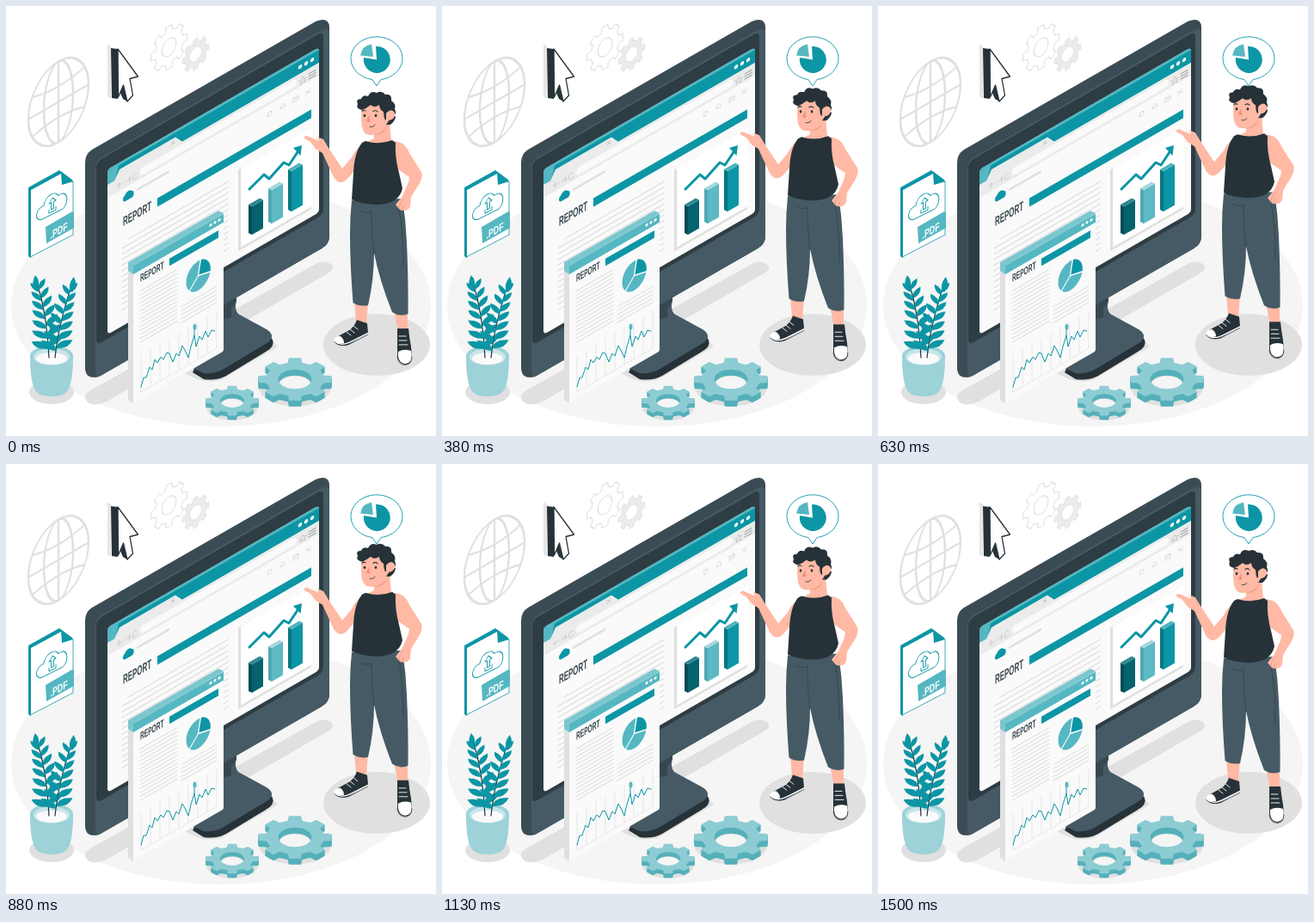
Write an HTML page that moves like this. It is 500 by 500 pixels and loops after 1540 ms.

```html
<!DOCTYPE html>
<html lang="en">
<head>
<meta charset="utf-8">
<title>Report</title>
<style>
html, body { margin: 0; width: 100%; height: 100%; overflow: hidden; background: #fff }
svg { display: block; width: 100vw; height: 100vh }
text { font-family: "Liberation Sans", Arial, sans-serif; font-weight: 700 }
.ln { fill: none; stroke-linecap: round; stroke-linejoin: round }
.teal { fill: #0c96a5 } .mid { fill: #55b7c1 } .pale { fill: #9dd2d9 }
.dark { fill: #263238 } .slate { fill: #37474f } .steel { fill: #455a64 }
.grey { fill: #e0e0e0 } .white { fill: #fff } .skin { fill: #ffb9a4 }
</style>
</head>
<body>
<svg viewBox="0 0 500 500">
  <ellipse cx="250" cy="348" rx="244" ry="141" fill="#f5f5f5"/>
  <g class="grey">
    <ellipse cx="431" cy="394" rx="62" ry="36"/>
    <ellipse cx="53" cy="449" rx="26" ry="14"/>
    <path d="M92 456Q91 451 98 447L362 299Q369 295 378 300Q384 305 374 311L122 457Q112 464 100 463Q93 461 92 456Z"/>
    <path d="M208 427L250 402L310 390L316 396L250 435Q235 439 220 433Z"/>
  </g>

  <!-- globe -->
  <g class="ln" transform="matrix(1 -.58 0 1 61 111.5)" stroke="#e0e0e0" stroke-width="2.4">
    <ellipse rx="35" ry="47"/><ellipse rx="17" ry="47"/>
    <path d="M0-47V47M-35 0H35M-30-23Q0-13 30-23M-30 23Q0 13 30 23"/>
  </g>
  <g id="skyGears" stroke="#e0e0e0"></g>

  <!-- pointer -->
  <path d="M118 44L122 47V108L118 105Z" fill="#e6e6e6"/>
  <path class="dark" d="M122 49L130 50V108L123 107ZM133 101L136 92L141 111L136 108Z"/>
  <path d="M130 50L153.500 82L144 84.500L147.500 104L141 111L136.500 92L130.500 106Z" fill="#fff" stroke="#263238" stroke-width="1.300" stroke-linejoin="round"/>

  <!-- PDF sheet -->
  <path class="white" d="M28 213L64 193L78 204V266L28 292Z" stroke="#0c96a5" stroke-width=".8"/>
  <path class="teal" d="M26 211L62 191L77 202L78 205L64 195L29 214V293L26 291ZM64 194L78 204L65 208Z"/>
  <g class="ln" transform="matrix(1 -.5 0 1 54 231)" stroke="#0c96a5" stroke-width=".9">
    <path d="M-12 11A7 7 0 0 1-10-4A9 10 0 0 1 7-7A7 9 0 0 1 12 11Z"/>
    <path d="M-1.500 5V-3H-4L0-8L4-3H1.500V5ZM-4 4V8H4V4"/>
  </g>
  <path class="mid" d="M46 257L77 239L79 240V258L47 276Z"/>
  <text transform="matrix(.68 -.37 0 1 51.500 271)" font-size="13" fill="#fff">.PDF</text>

  <!-- plant -->
  <path class="pale" d="M28 407Q28 434 33 445Q37 454 53 454Q69 454 73 445Q78 434 78 407Z"/>
  <ellipse class="pale" cx="53" cy="407" rx="25" ry="12"/>
  <ellipse cx="53" cy="408" rx="21" ry="9.500" fill="#c8e6ea"/>
  <ellipse cx="53" cy="410" rx="18" ry="7" fill="#fafafa"/>
  <g id="plant"></g>

  <!-- monitor -->
  <path class="dark" d="M217 426L250 358L265 360L304 381L310 388Q313 396 302 402L256 430Q245 436 230 434Z"/>
  <path class="steel" d="M217 421L236 345L268 330V343Q265 352 270 358L303 376Q314 383 305 391L255 421Q245 428 230 427Z"/>
  <path class="slate" d="M240 345L268 328V343L262 352L262 362L240 368Z"/>
  <path d="M92 182Q92 172 100 167L360 18Q375 12 376 24V268Q376 277 367 282L108 431Q92 435 92 420Z" fill="#3b4b54"/>
  <path class="steel" d="M104 189Q104 180 111 176L365 29Q376 24 376 32V268Q376 277 367 282L110 430Q104 433 104 424Z"/>
  <g transform="matrix(1 -.577 0 1 118 187)">
    <rect x="-13" y="-13" width="264" height="213" rx="6" fill="#2e3c43"/>
    <rect y="3" width="246" height="192" rx="4" fill="#fafafa"/>
    <path class="teal" d="M0 21V7Q0 3 4 3H242Q246 3 246 7V21Z"/>
    <path class="mid" d="M0 21V7Q0 3 4 3H242Q245 3 246 6H13L9 21Z"/>
    <path d="M0 21H8L14 11H79L87 21H246V36H0Z" fill="#ebebeb"/>
    <g class="white"><circle cx="224" cy="13" r="2.200"/><circle cx="231" cy="13" r="2.200"/><circle cx="238" cy="13" r="2.200"/></g>
    <rect x="38" y="24" width="182" height="9" rx="4" fill="#fafafa"/>
    <g class="ln" stroke="#c4c4c4" stroke-width=".8">
      <path d="M74 14L78 18M78 14L74 18M12 29H18M12 29L14 26.500M12 29L14 31.500M21 29H27M27 29L25 26.500M27 29L25 31.500M34 27A2.700 3.400 0 1 0 34.500 31"/>
      <path d="M227 26L228 29H231L229 31L230 34L227 32L224 34L225 31L223 29H226Z"/>
      <path d="M234 27H242M234 30H242M234 33H242" stroke="#a0a0a0" stroke-width="1.200"/>
      <path d="M186 47A2.500 2.500 0 1 0 191 47A2.500 2.500 0 1 0 186 47M201 49H207L206 47V46Q204 43 202 46V47ZM216 45H222V50H216ZM216 45L219 48L222 45M231 45L236 50M236 45L231 50" stroke="#d6d6d6"/>
    </g>
    <rect x="34" y="45" width="38" height="3" fill="#e0e0e0"/>
    <path class="teal" d="M20 52A4 4 0 0 1 20 45A5 6 0 0 1 28 44A4 4.500 0 0 1 29 52Z"/>
    <rect class="teal" x="58" y="70" width="179" height="10"/>
    <path id="pageRows" class="ln" stroke="#e0e0e0" stroke-width="1.400"/>
    <rect class="grey" x="152" y="91" width="85" height="95"/>
    <rect class="white" x="155" y="91" width="83" height="92"/>
  </g>
  <text transform="matrix(.53 -.306 0 1 136 256)" font-size="15" fill="#37474f">REPORT</text>
  <g id="bars"></g>
  <path class="ln" d="M283 213L300 196L306 201L323 182L329 185L341 167" stroke="#0c96a5" stroke-width="3"/>
  <path class="teal" d="M334 165L344 162L342.500 174Z"/>

  <!-- report window -->
  <path class="grey" d="M142 300L148 303V462L142 458Z"/>
  <path d="M142 298L247 238L253 241L148 312L142 308Z" fill="#7cc7cf"/>
  <g transform="matrix(1 -.577 0 1 148 302)">
    <rect width="105" height="160" rx="2" fill="#fafafa"/>
    <rect class="mid" width="105" height="10"/>
    <g class="white"><circle cx="90" cy="4.500" r="1.600"/><circle cx="95" cy="4.500" r="1.600"/><circle cx="100" cy="4.500" r="1.600"/></g>
    <rect class="teal" x="42" y="16" width="57" height="8.500"/>
    <path id="windowRows" class="ln" stroke="#dcdcdc" stroke-width="1.100"/>
    <g transform="translate(75.500 55) scale(15 18)" stroke="#fafafa" stroke-width=".09">
      <circle class="mid" r="1"/>
      <path class="mid" d="M0 0L-.7 .7A1 1 0 0 1 .2-.98Z"/>
      <path class="teal" d="M0 0L.2-.98A1 1 0 0 1 .98 .2Z"/>
    </g>
    <path id="chartGrid" class="ln" stroke="#e0e0e0" stroke-width=".8"/>
  </g>
  <text transform="matrix(.53 -.306 0 1 156 321)" font-size="12.500" fill="#37474f">REPORT</text>
  <path class="ln" stroke="#0c96a5" stroke-width="1" d="M157 443L160 432L163 432L167 420L170 423L173 411L176 415L180 408L183 411L187 403L190 404L194 414L198 404L201 407L205 395L208 400L212 409L215 396L219 383L221 396L225 384L228 388L232 378L235 385L239 377L243 378M219 383V373"/>
  <ellipse class="mid" cx="219.500" cy="373" rx="2" ry="3.500"/>

  <g id="floorGears"></g>

  <!-- thought bubble -->
  <path d="M426 85.500A30 25 0 1 1 436 85.500L431 93Z" fill="#fff" stroke="#0c96a5" stroke-width=".9"/>
  <path class="teal" d="M431 62.500L430 47A15.500 15.500 0 1 1 416 60Z"/>
  <path class="mid" d="M427 59L425 44.500Q414 46 412 57.500Z"/>

  <g id="man">
    <!-- legs and shoes -->
    <path class="skin" d="M405 343H421L419 370L407 367ZM451 354H467V378H456Z"/>
    <path class="dark" d="M408 365L420 369L421 380Q417 384 411 386L398 394Q386 397 382 390Q382 386 388 383L399 377Q405 373 408 365ZM455 375H468Q469 386 471 396L472 408Q471 417 464 417Q456 416 455 407Z"/>
    <path class="white" d="M381.500 387Q385 383 389 384Q393 387 393 392Q385 394 381.500 390ZM456 402Q463 398 471 401Q474 415 464 416Q455 415 456 402Z"/>
    <path class="ln" stroke="#fff" stroke-width="1.400" d="M382 390.500Q390 396 400 391L421 380.500"/>
    <path class="ln" stroke="#fff" stroke-width=".9" d="M396 379L401 383M400 376L405 380M404 372L409 376M457 384H465M457 389H466M457 394H467"/>
    <path class="ln" stroke="#263238" stroke-width=".7" d="M381.500 390.500Q388 397 399 393.500L421 382M455 408Q456 417 464 417.500Q472 417 472 408"/>
    <path class="steel" d="M402 226L461 224Q465 250 466 275Q468 320 467.500 358Q458 362 449 356Q434 318 428 287Q428 318 421 348Q411 350 403.500 345Q400 300 400 265Q400 245 402 226Z"/>
    <path class="ln" stroke="#37474f" stroke-width="1" d="M457 236Q462 262 462 302M425 238Q424 262 428 288M412 238Q416 241 425 240"/>
    <!-- far arm -->
    <path class="skin" d="M449 157Q464 157 469 171L483 193Q485 198 481 206L471 222L470 233Q467 240 458 237L453 231L461 221L468 205L469 199L456 190L448 175Z"/>
    <path class="ln" stroke="#e98f7c" stroke-width=".7" d="M457 236Q457 229 462 225M461 237L462 232"/>
    <!-- near arm -->
    <path class="skin" d="M418 158Q407 165 402 176L391 189L375 165L369 155L362 152L364 157L350 151Q346 151 347 154L354 158L360 166L368 171L381 199Q388 210 397 201L409 187Z"/>
    <!-- torso -->
    <path class="skin" d="M427 142L446 136L448 156Q436 167 420 158L428 154Z"/>
    <path d="M428 150Q439 150 443 141L428 147Z" fill="#f09a87"/>
    <path class="dark" d="M418 157Q434 162 449 156L453 159Q452 176 457 194L461 212Q457 231 430 231Q412 230 402 225L404 194Q405 170 414 159Z"/>
    <!-- head -->
    <path class="skin" d="M414 117Q412 130 414 141Q416 150 424 150Q434 150 441 143L447 137Q454 134 452 126L446 110L424 110Z"/>
    <path class="dark" d="M414 121Q406 119 409 114Q406 108 413 108Q415 103 421 105Q424 98 431 101Q437 98 441 103Q449 102 448 110Q454 114 452 120Q455 126 450 127Q444 121 443 130L441 133Q439 129 439 123Q434 120 434 115Q428 119 424 115Q419 119 414 121Z"/>
    <path class="dark" d="M446 132Q449 133 450 129L453 128Q453 133 447 138L442 138Z"/>
    <path class="skin" d="M442 125Q448 118 452 124Q453 131 446 133L442 131Z"/>
    <path class="ln" stroke="#263238" stroke-width="1.100" d="M414 122.500Q416 120.500 418 122M427 122.500Q430 120.500 432 123"/>
    <g class="dark"><ellipse cx="417" cy="127.500" rx="1.300" ry="1.700"/><ellipse cx="430" cy="127.500" rx="1.300" ry="1.700"/></g>
    <path d="M422 127L419 134L423 135Z" fill="#f08c78"/>
    <path class="ln" stroke="#263238" stroke-width=".8" d="M423 140.500Q426 142 429 138.500"/>
  </g>
</svg>
<script>
const $ = id => document.getElementById(id);
const LOOP = 1540, LIFT = 8, LEAD = 50;

// Horizontal rules from x0 to x1, one every `step`
function rows(x0, x1, y0, y1, step) {
  let d = '';
  for (let y = y0; y <= y1; y += step) d += `M${x0} ${y}H${x1}`;
  return d;
}

function gearPath(rx, ry, teeth, hole) {
  const points = [];
  const shape = [[-.46, .78], [-.29, .8], [-.21, 1], [.21, 1], [.29, .8], [.46, .78]];
  for (let i = 0; i < teeth; i++)
    for (const [offset, r] of shape) {
      const a = (i + offset) * 2 * Math.PI / teeth;
      points.push(`${(rx * r * Math.cos(a)).toFixed(1)} ${(ry * r * Math.sin(a)).toFixed(1)}`);
    }
  const hx = rx * hole, hy = ry * hole;
  return `M${points.join('L')}ZM${-hx} 0A${hx} ${hy} 0 1 0 ${hx} 0A${hx} ${hy} 0 1 0 ${-hx} 0Z`;
}

function skyGear(x, y, rx, ry, hole, fill, width) {
  return `<path transform="matrix(1 -.577 0 1 ${x} ${y})" d="${gearPath(rx, ry, 8, hole)}"
    fill="${fill}" fill-rule="evenodd" stroke-width="${width}"/>`;
}

function floorGear(x, y, rx, ry, depth) {
  const d = gearPath(rx, ry, 8, .45);
  const layer = (dy, fill) =>
    `<path transform="translate(${x} ${y + dy})" d="${d}" fill="${fill}" fill-rule="evenodd"/>`;
  let out = `<ellipse cx="${x}" cy="${y + depth + 2}" rx="${rx * .98}" ry="${ry * .9}" fill="#e0e0e0"/>
    <ellipse cx="${x}" cy="${y + depth}" rx="${rx * .42}" ry="${ry * .42}" fill="#f5f5f5"/>`;
  for (let dy = depth; dy > 0; dy--) out += layer(dy, '#55b0ba');
  return out + layer(0, '#8dccd3');
}

function bar(x, top, bottom, front, side, cap) {
  return `<path d="M${x} ${top}l4 2V${bottom}l-4-2Z" fill="${side}"/>
    <path d="M${x + 4} ${top + 2}l13-7.500V${bottom - 7.5}l-13 7.500Z" fill="${front}"/>
    <path d="M${x} ${top}l13-7.500l4 2l-13 7.500Z" fill="${cap}"/>`;
}

// A curved stem with leaves on both sides, shrinking to the tip
function stem(x0, y0, cx, cy, x1, y1, tilt) {
  let out = `<path class="ln" d="M${x0} ${y0}Q${cx} ${cy} ${x1} ${y1}" stroke="#263238" stroke-width="1.200"/>`;
  const at = (a, b, c, t) => (1 - t) ** 2 * a + 2 * t * (1 - t) * b + t * t * c;
  const leaf = (x, y, angle, size, flip) =>
    `<path class="teal" transform="translate(${x} ${y}) rotate(${angle}) scale(${size} ${size * flip})" d="M0 0Q5-10 21-4Q14 5 0 0Z"/>`;
  for (let i = 0; i < 7; i++) {
    const t = .14 + i * .125, x = at(x0, cx, x1, t), y = at(y0, cy, y1, t), size = 1 - i * .05;
    out += leaf(x, y, tilt - 22 - i * 4, size, 1) + leaf(x, y + 3, tilt + 198 + i * 4, size, -1);
  }
  return out + leaf(x1, y1 + 10, tilt - 80, .85, 1);
}

$('skyGears').innerHTML = skyGear(189.5, 48, 21, 25, .4, 'none', 1.1) +
  skyGear(220.5, 56, 15.5, 18, .45, '#ebebeb', .8);
$('floorGears').innerHTML = floorGear(336, 434, 43, 25, 7) + floorGear(263, 459, 31, 17.5, 5);
$('bars').innerHTML = bar(282, 231, 266, '#05636e', '#034c55', '#2d8791') +
  bar(305, 212, 253, '#5db9c3', '#4fa9b3', '#a8d8dd') +
  bar(328, 190, 239, '#0c96a5', '#087782', '#4fb3be');
$('plant').innerHTML = stem(50, 409, 48, 360, 36, 321, -6) + stem(57, 409, 61, 370, 77, 323, 6);
$('pageRows').setAttribute('d', rows(24, 140, 98, 104, 6.5) + rows(17, 140, 104.5, 182, 6.5));
$('windowRows').setAttribute('d', rows(8, 51, 34, 96, 4.6) + rows(56, 97, 80, 101, 4.6));
let grid = 'M9 152H97';
for (let x = 9; x <= 97; x += 11) grid += `M${x} 109V152`;
$('chartGrid').setAttribute('d', grid);

function frame() {
  const phase = (performance.now() + LEAD) % LOOP / LOOP;
  const y = -LIFT / 2 * (1 - Math.cos(2 * Math.PI * phase));
  $('man').setAttribute('transform', `translate(0 ${y.toFixed(2)})`);
  requestAnimationFrame(frame);
}
frame();
</script>
</body>
</html>
```
